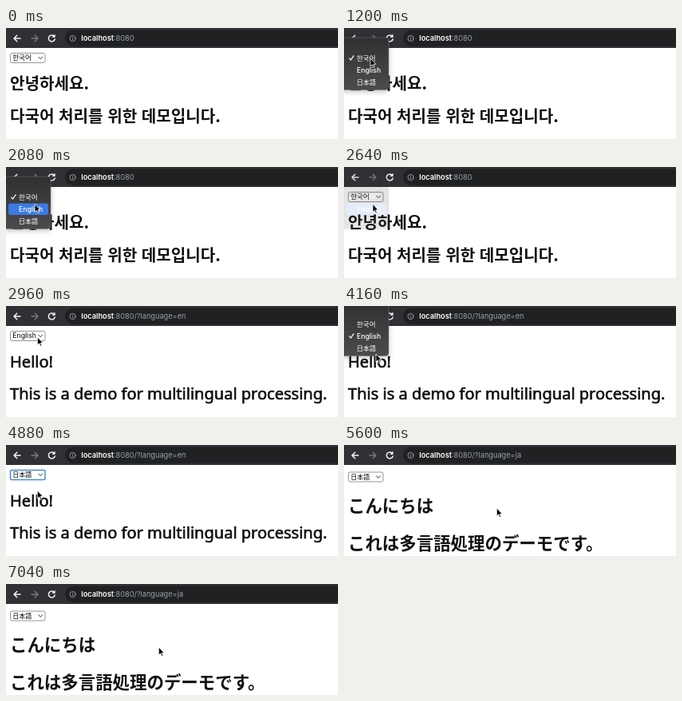
Write an HTML page that moves like this. It is 416x139 px and loops after 7360 ms.

```html
<!DOCTYPE html>
<html lang="ko">
<head>
<meta charset="utf-8">
<title>Language switch demo</title>
<style>
  html, body { margin: 0; width: 100%; height: 100%; overflow: hidden; background: #fff; }
  svg { display: block; width: 416px; height: 139px; }
  .ui { font-family: Inter, "Noto Sans CJK KR", sans-serif; }
  .ko { font-family: "Noto Sans CJK KR", "Noto Sans CJK", sans-serif; }
  .ja { font-family: "Noto Sans CJK JP", "Noto Sans CJK", sans-serif; }
  .title { fill: #111; }
  .title.ko { font-size: 20.1px; font-weight: 700; }
  .title.en { font: 400 20.05px "Noto Sans", "Open Sans", sans-serif; stroke: #111; stroke-width: .65px; }
  .title.ja { font-size: 21.45px; font-weight: 700; }
  .label.ko { font-size: 8.5px; }
  .label.en { font: 8.7px Inter, sans-serif; }
  .label.ja { font-size: 8px; }
  #items { font-weight: 500; }
  #items .en { font-weight: 500; }
  .line { fill: none; stroke-linecap: round; stroke-linejoin: round; }
</style>
</head>
<body>
<svg viewBox="0 0 416 139">
  <defs>
    <linearGradient id="glass" x1="0" y1="0" x2="0" y2="1">
      <stop offset="0" stop-color="#303031"/>
      <stop offset=".35" stop-color="#3a3a3b"/>
      <stop offset="1" stop-color="#4b4b4c"/>
    </linearGradient>
    <filter id="shade" x="-30%" y="-30%" width="160%" height="160%">
      <feDropShadow dx="0" dy="2" stdDeviation="3" flood-opacity=".25"/>
    </filter>
  </defs>

  <rect width="416" height="139" fill="#fff"/>
  <rect width="416" height="25" fill="#303134"/>
  <rect x="74" y="2.5" width="380" height="20.5" rx="10.2" fill="#202123"/>
  <g class="line" stroke-width="1.5">
    <path d="M18 13H10M13.8 9.2L10 13L13.8 16.8" stroke="#f1f3f4"/>
    <path d="M32 13H40M36.2 9.2L40 13L36.2 16.8" stroke="#77787b"/>
    <path d="M60.6 10.6A4 4 0 1 0 61.2 14" stroke="#f1f3f4"/>
    <path d="M61.2 8.6V11.4H58.4Z" stroke="#f1f3f4" stroke-width=".8" fill="#f1f3f4"/>
    <circle cx="83.6" cy="13" r="3.6" stroke="#a4a5a8" stroke-width=".9"/>
    <path d="M83.6 12.8V14.8M83.6 11.2V11.3" stroke="#a4a5a8" stroke-width=".9"/>
  </g>
  <text class="ui" x="94.3" y="16.3" font-size="9.2" fill="#9aa0a6"><tspan fill="#fff" font-weight="600">localhost</tspan><tspan id="path"></tspan></text>

  <g id="select">
    <rect id="frame" x="5.5" y="31.5" width="43.5" height="12" rx="2" fill="#fff"/>
    <text id="chosen"></text>
    <path class="line" d="M40.8 36.3L43.2 38.7L45.6 36.3" stroke="#333" stroke-width="1"/>
  </g>
  <text id="hello"></text>
  <text id="about"></text>

  <g id="menu">
    <rect x="-4" y="12" width="60" height="65.5" rx="4" fill="url(#glass)" stroke="#77777a" stroke-width=".5" filter="url(#shade)"/>
    <rect id="hover" x="3" width="50" height="14.4" rx="3" fill="#3a7be6"/>
    <path id="check" class="line" d="M6.8 .3L8.6 2.4L12 -2.8" stroke="#fff" stroke-width="1.2"/>
    <g id="items" fill="#fff"></g>
  </g>

  <path id="cursor" d="M0 0V10L2.3 7.9L3.8 11.4L5.4 10.7L3.9 7.3H7Z" fill="#000" stroke="#fff" stroke-width=".8" stroke-linejoin="round"/>
</svg>
<script>
const LOOP = 7360, STEP = 80, ROW = 15, FIRST_ROW = 37.6;
const $ = id => document.getElementById(id);

const langs = [
  { id: 'ko', name: '한국어', path: ':8080', hello: '안녕하세요.', about: '다국어 처리를 위한 데모입니다.', y: [77, 117.5], drop: 0 },
  { id: 'en', name: 'English', path: ':8080/?language=en', hello: 'Hello!', about: 'This is a demo for multilingual processing.', y: [76.8, 117.2], drop: 0 },
  { id: 'ja', name: '日本語', path: ':8080/?language=ja', hello: 'こんにちは', about: 'これは多言語処理のデーモです。', y: [84, 131], drop: 2.5 }
];

// Each key is [time, x, y]; the pointer eases from one to the next.
const moves = [
  [640, -9, 52], [960, 33, 38], [1680, 33, 38], [2000, 36, 46.5], [2720, 36, 46.5],
  [3040, 40, 37.5], [3520, 40, 37.5], [3760, 40, 69], [3840, 40, 69],
  [4160, 40, 60], [4320, 39.3, 57], [5280, 39.3, 57], [5600, 191.3, 79], [LOOP, 191.3, 79]
];

const menus = [
  { open: 1040, close: 2520, checked: 0, hovers: [[1760, 0], [1920, 1]] },
  { open: 3200, close: 4680, checked: 1, hovers: [[3360, 1], [3600, 2], [3720, -1], [4240, 2]] }
];
const FADE = 180;

const pick = (keys, t, start) => keys.reduce((v, [at, next]) => t >= at ? next : v, start);
const ease = p => p * p * (3 - 2 * p);

function write(el, cls, text, x, y) {
  el.setAttribute('class', cls);
  el.setAttribute('x', x);
  el.setAttribute('y', y);
  if (el.textContent !== text) el.textContent = text;
}

langs.forEach((lang, i) => {
  const item = document.createElementNS('http://www.w3.org/2000/svg', 'text');
  write(item, 'label ' + lang.id, lang.name, 16, FIRST_ROW + 3 + i * ROW);
  $('items').append(item);
});

function drawPage(t) {
  const page = langs[pick([[2880, 1], [5040, 2]], t, 0)];
  const chosen = langs[pick([[2720, 1], [4800, 2]], t, 0)];
  const focus = page !== chosen;
  $('path').textContent = page.path;
  write($('hello'), 'title ' + page.id, page.hello, 5, page.y[0]);
  write($('about'), 'title ' + page.id, page.about, 5, page.y[1]);
  write($('chosen'), 'label ' + chosen.id, chosen.name, 8.3, 40.3);
  $('frame').setAttribute('stroke', focus ? '#4a88d6' : '#8a8a8a');
  $('frame').setAttribute('stroke-width', focus ? 1.5 : .9);
  $('select').setAttribute('transform', `translate(0 ${page.drop})`);
}

function drawMenu(t) {
  const menu = menus.find(m => t >= m.open && t < m.close + FADE);
  $('menu').style.display = menu ? '' : 'none';
  if (!menu) return;
  const left = 1 - Math.max(0, t - menu.close) / FADE;
  $('menu').setAttribute('opacity', left ** 1.8);
  $('menu').setAttribute('transform', `translate(0 ${-menu.checked * ROW})`);
  $('check').setAttribute('transform', `translate(0 ${FIRST_ROW + menu.checked * ROW})`);
  const row = pick(menu.hovers, t, -1);
  $('hover').style.display = row < 0 ? 'none' : '';
  $('hover').setAttribute('y', FIRST_ROW - 7.1 + row * ROW);
}

function drawCursor(t) {
  const i = moves.findIndex(m => m[0] > t);
  $('cursor').style.display = i > 0 ? '' : 'none';
  if (i < 1) return;
  const [t0, x0, y0] = moves[i - 1], [t1, x1, y1] = moves[i];
  const p = ease((t - t0) / (t1 - t0));
  $('cursor').setAttribute('transform', `translate(${x0 + (x1 - x0) * p} ${y0 + (y1 - y0) * p})`);
}

function render(now) {
  const t = Math.floor((now % LOOP) / STEP) * STEP;
  drawPage(t);
  drawMenu(t);
  drawCursor(t);
}

const start = performance.now();
function tick() {
  render(performance.now() - start);
  requestAnimationFrame(tick);
}
tick();
</script>
</body>
</html>
```
